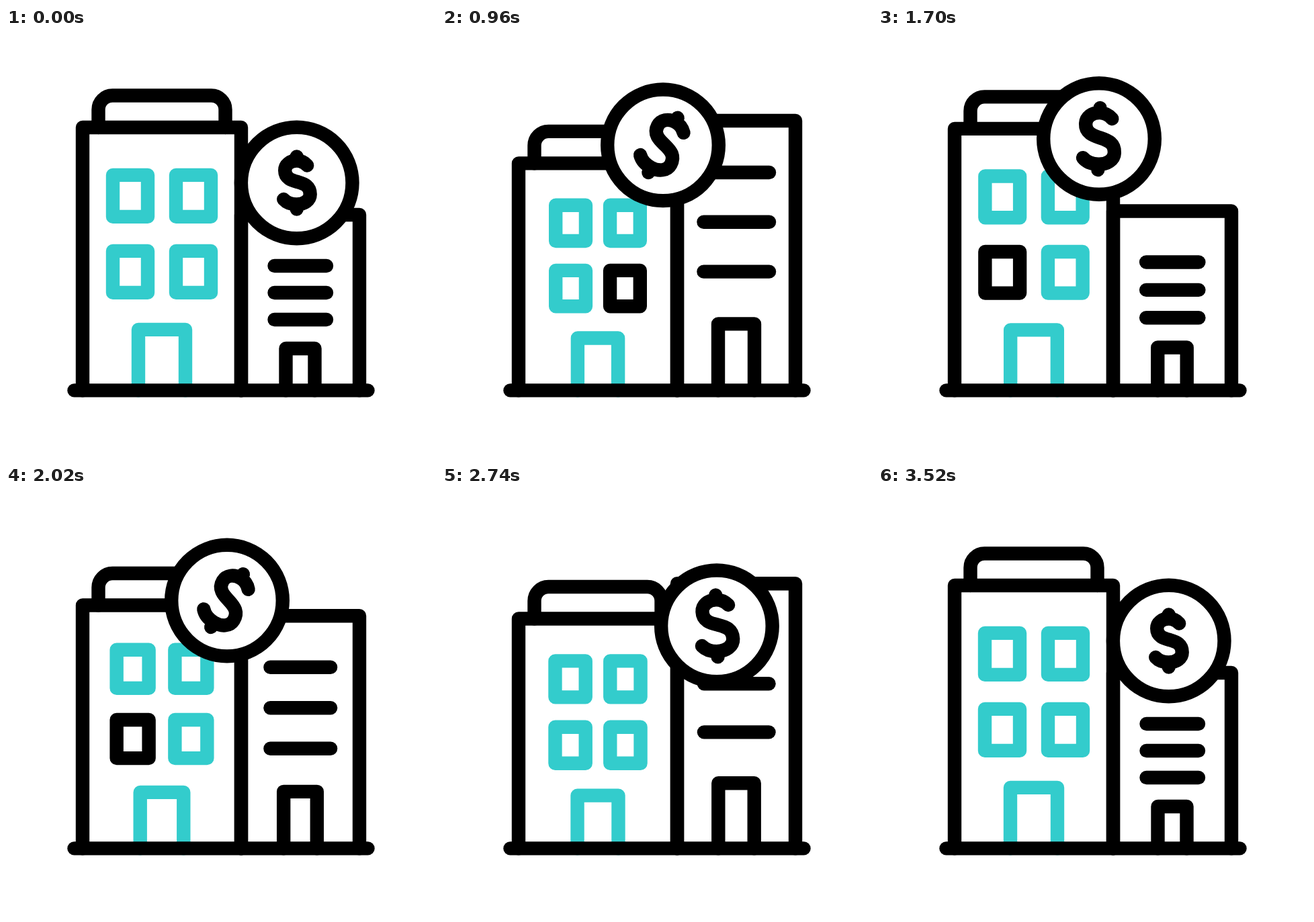
Recreate the animation shown at these times as an HTML page with a canvas. Size 640 by 640 pixels, loop 3.6 s.

```html
<!DOCTYPE html>
<html lang="en">
<head>
<meta charset="utf-8">
<title>Buildings and coin</title>
<style>
  html, body { margin: 0; width: 100%; height: 100%; overflow: hidden; background: #fff; }
  canvas { display: block; width: 640px; height: 640px; }
</style>
</head>
<body>
<canvas id="stage" width="640" height="640"></canvas>
<script>
const ctx = document.getElementById('stage').getContext('2d');
const LOOP = 3600, BASE = 539.4, STROKE = 20.4, TEAL = '#33cccc', BLACK = '#000';
const BLINK_START = 760, BLINK_TIME = 440;

const dollar = new Path2D(`M15.5-26C11-31 5-33 0-33C-10-33-17.5-27-17.5-18.5
  C-17.5-6-6-3.5 2-1.2C12 1.7 20 5 20 17C20 26 11 32 0 32
  C-8 32-15 29.5-19.5 24.5M0-39V-33M0 32V39`);

const clamp = (v, lo, hi) => Math.min(Math.max(v, lo), hi);
// Sine swing between 0 and 1, lowest at `low`, highest half a period later.
const wave = (t, low, half) => (1 - Math.cos(Math.PI * (t - low) / half)) / 2;
const ease = (t, start, end) => wave(clamp(t, start, end), start, end - start);
const bump = (t, start, end) => wave(clamp(t, start, end), start, (end - start) / 2);

function line(color, ...points) {
  ctx.strokeStyle = color;
  ctx.beginPath();
  points.forEach(([x, y]) => ctx.lineTo(x, y));
  ctx.stroke();
}

function door(color, left, right, top) {
  line(color, [left, BASE], [left, top], [right, top], [right, BASE]);
}

function rightBuilding(shrink) {
  const rise = 2.92 * shrink - 1.96e-6 * shrink ** 4;
  const k = rise / 153;
  door(BLACK, 350, 526, 278 - rise);
  for (let i = 0; i < 3; i++) {
    const y = 354 + 40 * i - (152 - 37 * i) * k;
    line(BLACK, [399.5 - 11 * k, y], [477 + 11 * k, y]);
  }
  door(BLACK, 416.5 - 6 * k, 459.5 + 6 * k, 477 - 40 * k);
}

function leftBuilding(shrink, t) {
  const top = 148 + shrink, roof = top - 47.5, s = 1 - shrink / 382;
  const px = x => 232 + x * s, py = y => BASE - y * s;

  ctx.strokeStyle = BLACK;
  ctx.beginPath();
  ctx.moveTo(137.5, top);
  ctx.arcTo(137.5, roof, 232, roof, 21);
  ctx.arcTo(326.5, roof, 326.5, top, 21);
  ctx.lineTo(326.5, top);
  ctx.stroke();
  door(BLACK, 114, 350, top);

  // The windows turn black one after another, last to first.
  const dark = 3 - Math.floor((t - BLINK_START) / BLINK_TIME);
  for (let i = 0; i < 4; i++) {
    const col = i >> 1, row = i & 1;
    ctx.strokeStyle = i === dark ? BLACK : TEAL;
    ctx.strokeRect(px(-73 + 94 * col), py(320.5 - 113 * row), 52 * s, 62 * s);
  }
  door(TEAL, px(-35), px(35), py(90.5));
}

function coin(t) {
  const away = ease(t, 220, 680) - ease(t, 2400, 2900);
  const active = ease(t, 220, 620) - ease(t, 3060, 3520);
  const tilt = ease(t, 220, 620) - ease(t, 2390, 2830);
  const bob = 29 * bump(t, 680, 1410) + 25 * bump(t, 1410, 2395);
  const angle = tilt * (56 * wave(clamp(t, 620, 2390), 620, 442.5) - 21);
  const scale = 1 + 0.18 * active;

  ctx.save();
  ctx.translate(432.7 - 103.7 * away, 230.5 - 77 * away - 4.5 * active + bob);
  ctx.fillStyle = '#fff';
  ctx.strokeStyle = BLACK;
  ctx.beginPath();
  ctx.arc(0, 0, 82.8, 0, 2 * Math.PI);
  ctx.fill();
  ctx.stroke();
  ctx.rotate(angle * Math.PI / 180);
  ctx.scale(scale, scale);
  ctx.lineWidth = STROKE / scale;
  ctx.stroke(dollar);
  ctx.restore();
}

function rays(t) {
  const head = ease(t, 3160, 3340), tail = ease(t, 3300, 3520);
  if (head === 0 || tail === 1) return;
  for (let i = 0; i < 3; i++) {
    const angle = -Math.PI / 12 * (1 + 2 * i);
    const point = p => {
      const r = 112 + 26 * p;
      return [432.7 + r * Math.cos(angle), 230.5 + r * Math.sin(angle)];
    };
    line(BLACK, point(tail), point(head));
  }
}

function draw(t) {
  const shrink = 63.2 * Math.min(ease(t, 220, 737), wave(Math.min(t, 3341), 1605, 868));
  ctx.fillStyle = '#fff';
  ctx.fillRect(0, 0, 640, 640);
  ctx.lineWidth = STROKE;
  ctx.lineCap = ctx.lineJoin = 'round';
  rightBuilding(shrink);
  leftBuilding(shrink, t);
  line(BLACK, [101.5, BASE], [538.5, BASE]);
  rays(t);
  coin(t);
}

const start = performance.now();
function tick() {
  draw((performance.now() - start) % LOOP);
  requestAnimationFrame(tick);
}
tick();
</script>
</body>
</html>
```
